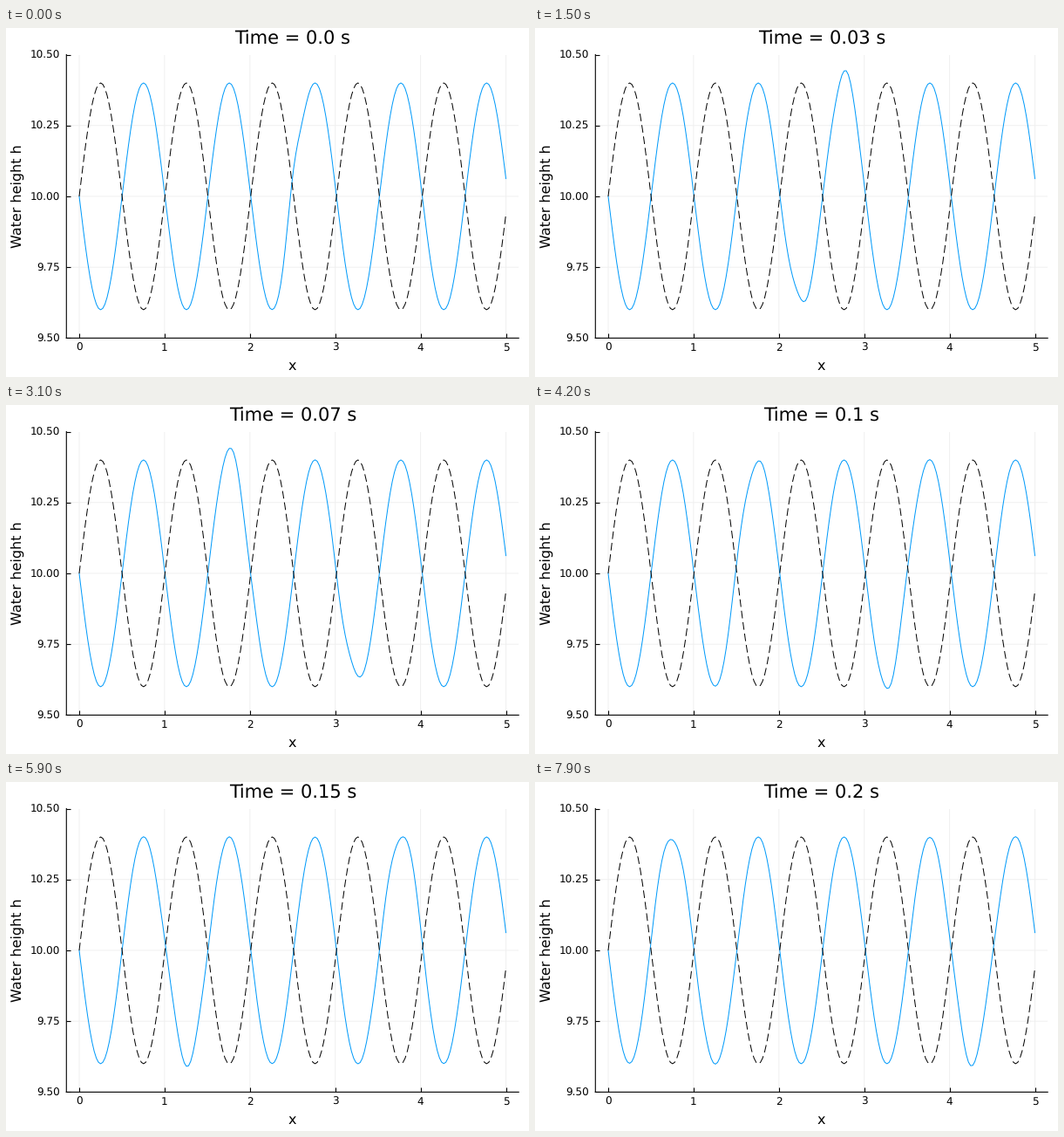
A matplotlib script for the animation above (8000 ms loop, 600 by 400 pixels).

```python
import numpy as np
import matplotlib.pyplot as plt
from matplotlib.animation import FuncAnimation

W, H, DPI = 600, 400, 100
PX = 72 / DPI                      # points per pixel
FRAMES, INTERVAL, HOLD = 80, 100, 3
N, LENGTH, G = 200, 5.0, 9.81
DT, SUBSTEPS = 0.2 / 76, 2

plt.rcParams["font.family"] = "DejaVu Sans"
plt.rcParams["text.hinting"] = "none"
plt.rcParams["text.hinting_factor"] = 1

# Shallow water over a wavy bed, periodic central differences
dx = LENGTH / N
x = np.linspace(0, LENGTH, N)
bed = 0.4 * np.sin(2 * np.pi * np.arange(N) * dx)


def diff(f):
    return (np.roll(f, -1) - np.roll(f, 1)) / (2 * dx)


def rate(state):
    h, q = state
    u = q / h
    dq = diff(q)
    advection = 0.5 * (diff(q * u) + q * diff(u) + u * dq)
    return np.array([-dq, -advection - G * h * diff(h + bed)])


def advance(state, dt):
    k1 = rate(state)
    k2 = rate(state + dt / 2 * k1)
    k3 = rate(state + dt / 2 * k2)
    k4 = rate(state + dt * k3)
    return state + dt / 6 * (k1 + 2 * k2 + 2 * k3 + k4)


def solve(steps):
    bump = 0.1 * np.exp(-((x - LENGTH / 2) / 0.1) ** 2)
    state = np.array([10 - bed + bump, np.zeros(N)])
    heights = [state[0]]
    for _ in range(steps):
        for _ in range(SUBSTEPS):
            state = advance(state, DT / SUBSTEPS)
        heights.append(state[0])
    return heights


heights = solve(FRAMES - 1 - HOLD)

fig = plt.figure(figsize=(W / DPI, H / DPI), dpi=DPI, facecolor="white")
left, right, top, bottom = 69.3, 588.2, 30.5, 355.4
ax = fig.add_axes([left / W, 1 - bottom / H, (right - left) / W, (bottom - top) / H])
ax.set(xlim=(-0.15, 5.15), ylim=(9.5, 10.5))
ax.set_xticks(range(6))
ax.set_yticks([9.5, 9.75, 10, 10.25, 10.5], ["9.50", "9.75", "10.00", "10.25", "10.50"])
ax.set_axisbelow(True)
ax.grid(color="#f0f0f0", linewidth=PX, snap=False)
ax.spines[["top", "right"]].set_visible(False)
for side in ("left", "bottom"):
    ax.spines[side].set(linewidth=1.1 * PX, snap=False)
ax.tick_params(direction="in", length=5 * PX, width=1.1 * PX, labelsize=11.8 * PX)
ax.tick_params(axis="x", pad=5.8 * PX)
ax.tick_params(axis="y", pad=7 * PX)


def label(px, py, text, size, **kw):
    return fig.text(px / W, 1 - py / H, text, fontsize=size * PX,
                    ha="center", va="baseline", **kw)


middle = (left + right) / 2
title = label(middle, 18.8, "", 20.7)
label(middle, 391.5, "x", 16.25)
label(17.5, 193, "Water height h", 16.25, rotation=90, rotation_mode="anchor")

water, = ax.plot(x, heights[0], color="#009afa", linewidth=PX)
ax.plot(x, 10 + bed, color="black", linewidth=PX,
        dashes=(8.8, 4.4), dash_capstyle="butt")


def draw(i):
    step = max(0, i - HOLD)
    water.set_ydata(heights[step])
    title.set_text(f"Time = {round(step * DT, 2)} s")
    return water, title


anim = FuncAnimation(fig, draw, frames=FRAMES, interval=INTERVAL,
                     init_func=lambda: draw(0), repeat=True, repeat_delay=0)
plt.show()
```
